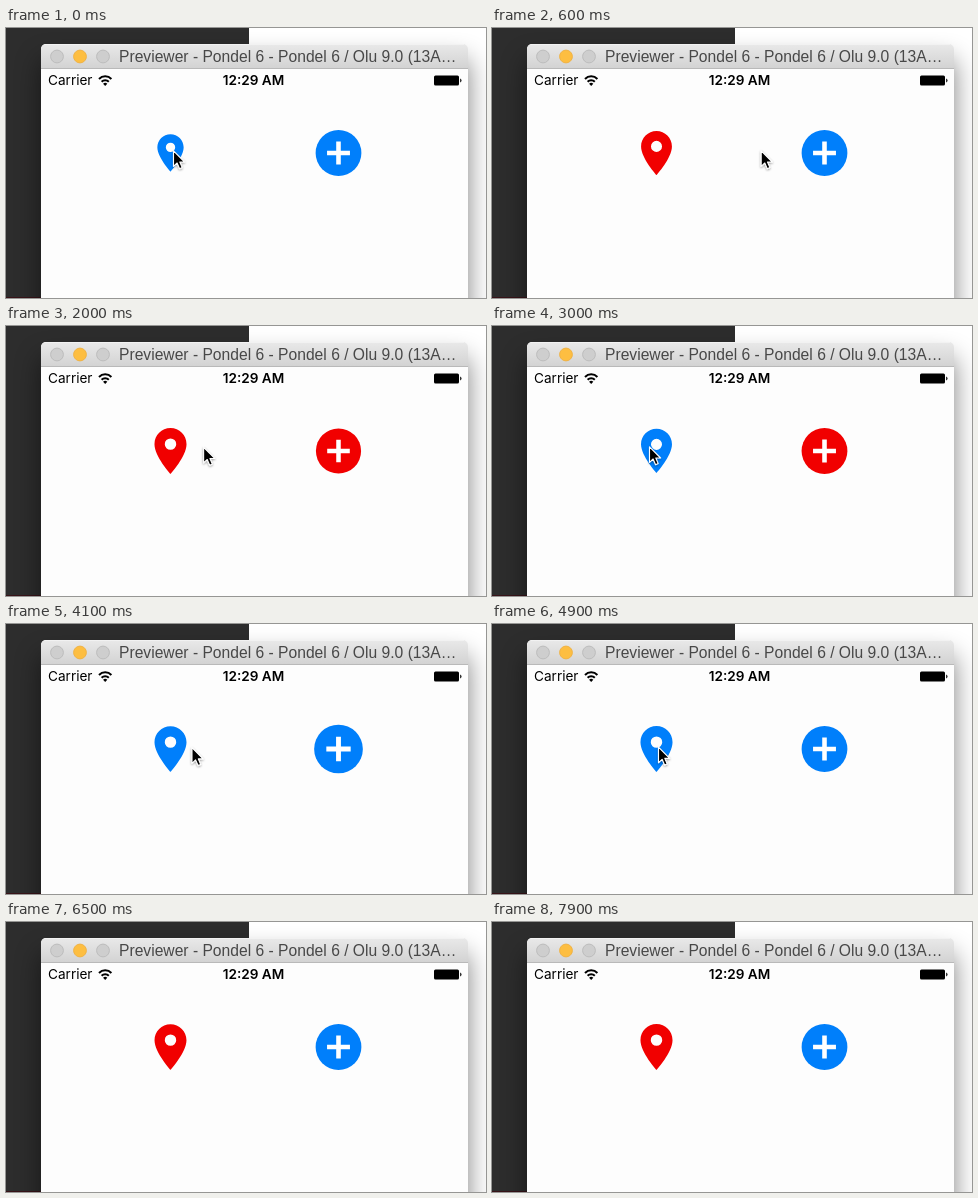
Recreate the animation shown at these times as an HTML page. Size 480 px wide and 270 px high, loop 8000 ms.

```html
<!DOCTYPE html>
<html lang="en">
<head>
<meta charset="utf-8">
<title>Tap buttons</title>
<style>
  html, body { margin: 0; width: 100%; height: 100%; overflow: hidden; background: #fff; }
  svg { display: block; width: 480px; height: 270px; }
  .title { font: 15.65px "Liberation Sans", Arial, sans-serif; fill: #484848; }
  .status { font: 13.6px Inter, Roboto, sans-serif; fill: #000; }
  .clock { font-weight: 600; text-anchor: middle; }
</style>
</head>
<body>
<svg viewBox="0 0 480 270">
  <defs>
    <linearGradient id="bar" x2="0" y2="1">
      <stop offset="0" stop-color="#e9e9e9"/>
      <stop offset="1" stop-color="#d2d2d2"/>
    </linearGradient>
    <filter id="windowShadow" x="-20%" y="-20%" width="140%" height="140%">
      <feGaussianBlur stdDeviation="13"/>
    </filter>
    <filter id="cursorShadow" x="-50%" y="-50%" width="200%" height="200%">
      <feDropShadow dx="0" dy="1" stdDeviation="1" flood-opacity=".4"/>
    </filter>
  </defs>

  <!-- desktop -->
  <rect width="480" height="270" fill="#fff"/>
  <rect width="243" height="270" fill="#2d2d2d"/>
  <rect y="269" width="35" height="1" fill="#391419"/>
  <rect x="35" y="32" width="427" height="320" opacity=".5" filter="url(#windowShadow)"/>

  <!-- window -->
  <path d="M35 270V21a5 5 0 0 1 5-5H457a5 5 0 0 1 5 5V270z" fill="#fdfdfd"/>
  <path d="M35 41V21a5 5 0 0 1 5-5H457a5 5 0 0 1 5 5V41z" fill="url(#bar)"/>
  <path d="M39 16.5H458" stroke="#f2f2f2"/>
  <path d="M35 40.5H462" stroke="#b9b9b9"/>
  <g stroke="#bdbdbd" fill="#cecece">
    <circle cx="51" cy="28.5" r="6.4"/>
    <circle cx="74" cy="28.5" r="6.4" fill="#fdbe41" stroke="#f0b346"/>
    <circle cx="97" cy="28.5" r="6.4"/>
  </g>
  <text class="title" x="113" y="34">Previewer - Pondel 6 - Pondel 6 / Olu 9.0 (13A…</text>

  <!-- status bar -->
  <text class="status" x="42" y="57">Carrier</text>
  <g fill="none" stroke="#000" stroke-width="2">
    <path d="M93 51a8.6 8.6 0 0 1 12.4 0"/>
    <path d="M95.6 53.8a5 5 0 0 1 7.2 0"/>
  </g>
  <path d="M99.2 58l-2.1-2.3a3 3 0 0 1 4.2 0z"/>
  <text class="status clock" x="247.5" y="57">12:29 AM</text>
  <rect x="428" y="47.5" width="25" height="10" rx="1.5"/>
  <path d="M454 50.5q1.6 .3 1.6 2t-1.6 2z" fill="#333"/>

  <!-- buttons, drawn on a 24-unit grid -->
  <g id="pin">
    <path fill-rule="evenodd" d="M12 2C8.13 2 5 5.13 5 9c0 5.25 7 13 7 13s7-7.75 7-13c0-3.87-3.13-7-7-7zm0 9.5a2.5 2.5 0 0 1 0-5 2.5 2.5 0 0 1 0 5z"/>
  </g>
  <g id="plus">
    <circle cx="12" cy="12" r="10"/>
    <path d="M7 12H17M12 7V17" stroke="#fff" stroke-width="2"/>
  </g>

  <path id="cursor" d="M.5 .8V16.4L4.1 13 6.6 18.7 9.2 17.6 6.8 12H11.6Z"
        stroke="#fff" stroke-width="1.1" stroke-linejoin="round" filter="url(#cursorShadow)"/>
</svg>
<script>
const LOOP = 8000, STEP = 100;
const BLUE = '#007ffb', RED = '#f10000';
const PRESSED = 0.82, PRESS_TIME = 100, GRID = 2.29;

const get = id => document.getElementById(id);
const cursor = get('cursor');

// Each tap is [press, release]; the colour toggles on release.
const buttons = [
  { node: get('pin'), x: 164.5, taps: [[-200, 200], [2600, 2930], [5050, 5370]] },
  { node: get('plus'), x: 332.5, taps: [[1050, 1300], [3600, 3880]] }
];

// Cursor tip: [time, x, y]
const path = [
  [0, 167, 122], [250, 167, 122], [850, 330, 122], [1450, 330, 122],
  [2250, 157, 120], [3050, 157, 120], [3450, 331, 122], [3880, 331, 122],
  [4160, 166, 123], [5380, 166, 122], [5600, 178, 123], [6300, 310, 285]
];

// Underdamped spring with ratio 0.2, settling in two seconds
function spring(seconds) {
  const decay = 3.45, freq = 16.9, speed = 6;
  const wave = Math.cos(freq * seconds) + (decay - speed) / freq * Math.sin(freq * seconds);
  return 1 - (1 - PRESSED) * Math.exp(-decay * seconds) * wave;
}

function scaleAt(taps, t) {
  const tap = taps.filter(([press]) => press <= t).pop();
  if (!tap) return 1;
  const [press, release] = tap;
  if (t >= release) return spring((t - release) / 1000);
  return 1 - (1 - PRESSED) * Math.min(1, (t - press) / PRESS_TIME);
}

function cursorAt(t) {
  const i = path.findIndex(([time]) => time > t);
  if (i < 0) return path[path.length - 1].slice(1);
  const [t0, x0, y0] = path[i - 1], [t1, x1, y1] = path[i];
  const p = (t - t0) / (t1 - t0), ease = p * p * (3 - 2 * p);
  return [x0 + (x1 - x0) * ease, y0 + (y1 - y0) * ease];
}

function draw(t) {
  for (const { node, x, taps } of buttons) {
    const toggles = taps.filter(([, release]) => release <= t).length;
    node.setAttribute('fill', toggles % 2 ? RED : BLUE);
    node.setAttribute('transform',
      `translate(${x} 125) scale(${GRID * scaleAt(taps, t)}) translate(-12 -12)`);
  }
  cursor.setAttribute('transform', `translate(${cursorAt(t)})`);
}

let start;
function tick(now) {
  start ??= now;
  draw(Math.floor((now - start) % LOOP / STEP) * STEP);
  requestAnimationFrame(tick);
}
draw(0);
requestAnimationFrame(tick);
</script>
</body>
</html>
```
